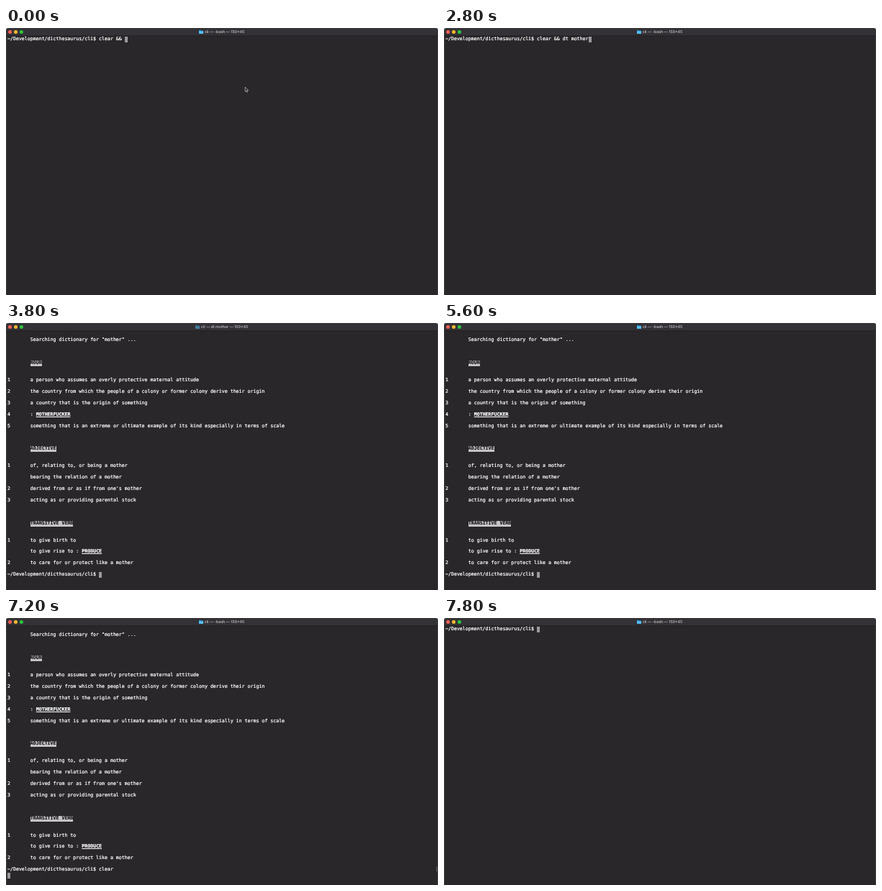
Write an HTML page that moves like this. It is 600 px wide and 371 px high and loops after 8000 ms.

```html
<!DOCTYPE html>
<html lang="en">
<head>
<meta charset="utf-8">
<title>Terminal dictionary</title>
<style>
  html, body { margin: 0; width: 100%; height: 100%; overflow: hidden; background: #29272a; }
  body { position: relative; text-rendering: geometricPrecision; }
  svg { position: absolute; left: 0; top: 0; }
  #title { font: 600 5.25px Inter, sans-serif; fill: #b9b7ba; text-anchor: middle; }
  #screen { position: absolute; left: 2px; top: 12.4px; color: #fff;
    font: 6.6px/7.95px "DejaVu Sans Mono", monospace; -webkit-text-stroke: .22px; }
  #screen span { position: absolute; height: 7.95px; white-space: pre; }
  #screen .link, #screen .head { font-weight: bold; }
  #screen .link { text-decoration: underline; }
  #screen .head { background: #c6c4c6; color: #1c1a1d; }
  #screen .cursor { background: #9b999c; width: 4px; margin-top: -.6px; }
  #screen .mark { color: #8a888b; -webkit-text-stroke: 0; }
</style>
</head>
<body>
<svg width="600" height="371" viewBox="0 0 600 371">
  <rect width="600" height="4" fill="#e4e4e4"/>
  <path d="M0 371V3q0-3 3-3h594q3 0 3 3v368z" fill="#4a484b"/>
  <path d="M.6 371V3.6q0-2.8 2.8-2.8h593.2q2.8 0 2.8 2.8V371z" fill="#29272a"/>
  <path d="M.6 11V3.6q0-2.8 2.8-2.8h593.2q2.8 0 2.8 2.8V11z" fill="#343236"/>
  <rect y="10.5" width="600" height=".7" fill="#1c1b1d"/>
  <circle cx="5.6" cy="5.6" r="2.5" fill="#ff5f57"/>
  <circle cx="13.5" cy="5.6" r="2.5" fill="#febc2e"/>
  <circle cx="21.4" cy="5.6" r="2.5" fill="#28c840"/>
  <g id="folder">
    <path d="M0 .6q0-.6.6-.6h1.6l.7.7h2.5q.6 0 .6.6v3.2q0 .6-.6.6H.6q-.6 0-.6-.6z" fill="#2b9fe0"/>
    <path d="M0 1.6h6v2.9q0 .6-.6.6H.6q-.6 0-.6-.6z" fill="#55bff5"/>
  </g>
  <text id="title" x="303.5" y="7.3"></text>
  <path id="pointer" d="M332.2 82.2v6l1.4-1.2 1 2.2 1-.5-1-2.1h1.9z"
    fill="#111" stroke="#eee" stroke-width=".6"/>
</svg>
<div id="screen"></div>
<script>
const LOOP = 8000, COL = 3.973, ROW = 7.95, INDENT = 8;
const PROMPT = "~/Development/dicthesaurus/cli$ ";
const $ = id => document.getElementById(id);

// Each key press: [time, character]
const keys = (start, text) => [...text].map((char, i) => [start + i * 200, char]);
const COMMAND = [...keys(600, "dt "), [1400, "m"], ...keys(2000, "other")];
const CLEAR = keys(6000, "clear");
const typed = (presses, t) => presses.filter(([at]) => at <= t).map(([, char]) => char).join("");

// Each entry: [row, text, sense number]; "_word" is a link, "#word" a heading
const ENTRIES = [
  [5, "#NOUN"],
  [8, "a person who assumes an overly protective maternal attitude", 1],
  [10, "the country from which the people of a colony or former colony derive their origin", 2],
  [12, "a country that is the origin of something", 3],
  [14, ": _MOTHERFUCKER", 4],
  [16, "something that is an extreme or ultimate example of its kind especially in terms of scale", 5],
  [20, "#ADJECTIVE"],
  [23, "of, relating to, or being a mother", 1],
  [25, "bearing the relation of a mother"],
  [27, "derived from or as if from one's mother", 2],
  [29, "acting as or providing parental stock", 3],
  [33, "#TRANSITIVE VERB"],
  [36, "to give birth to", 1],
  [38, "to give rise to : _PRODUCE"],
  [40, "to care for or protect like a mother", 2]
];

function put(row, col, text, kind = "") {
  const span = document.createElement("span");
  span.className = kind;
  span.textContent = text;
  span.style.left = col * COL + "px";
  span.style.top = row * ROW + "px";
  $("screen").append(span);
}

const cursor = (row, col) => put(row, col, "", "cursor");

function prompt(row, input, entered) {
  put(row, 0, PROMPT + input);
  if (!entered) return cursor(row, PROMPT.length + input.length);
  put(row, 149.5, "]", "mark");
  cursor(row + 1, 0);
}

function results() {
  for (const [row, text, number] of ENTRIES) {
    if (number) put(row, 0, number);
    if (text[0] === "#") {
      put(row, INDENT, text.slice(1), "head");
      continue;
    }
    const [plain, link] = text.split("_");
    put(row, INDENT, plain);
    if (link) put(row, INDENT + plain.length, link, "link");
  }
}

function draw(t) {
  const running = t >= 3400 && t < 4000;
  $("title").textContent = `cli — ${running ? "dt mother" : "-bash"} — 150×45`;
  $("folder").setAttribute("transform", `translate(${running ? 263 : 268} 3)`);
  $("folder").setAttribute("opacity", running ? 0.55 : 1);
  $("pointer").style.display = t < 600 ? "" : "none";
  $("screen").replaceChildren();

  if (t < 3400) return prompt(0, "clear && " + typed(COMMAND, t), t >= 3200);
  if (t < 3600) return cursor(0, 0);
  if (t >= 7400) return prompt(0, "");
  put(1, INDENT, 'Searching dictionary for "mother" ...');
  if (t < 3800) return cursor(2, 0);
  results();
  prompt(42, typed(CLEAR, t), t >= 7200);
}

let shown = -1;
function tick() {
  const step = Math.floor(performance.now() % LOOP / 200);
  if (step !== shown) draw((shown = step) * 200);
  requestAnimationFrame(tick);
}
tick();
</script>
</body>
</html>
```
